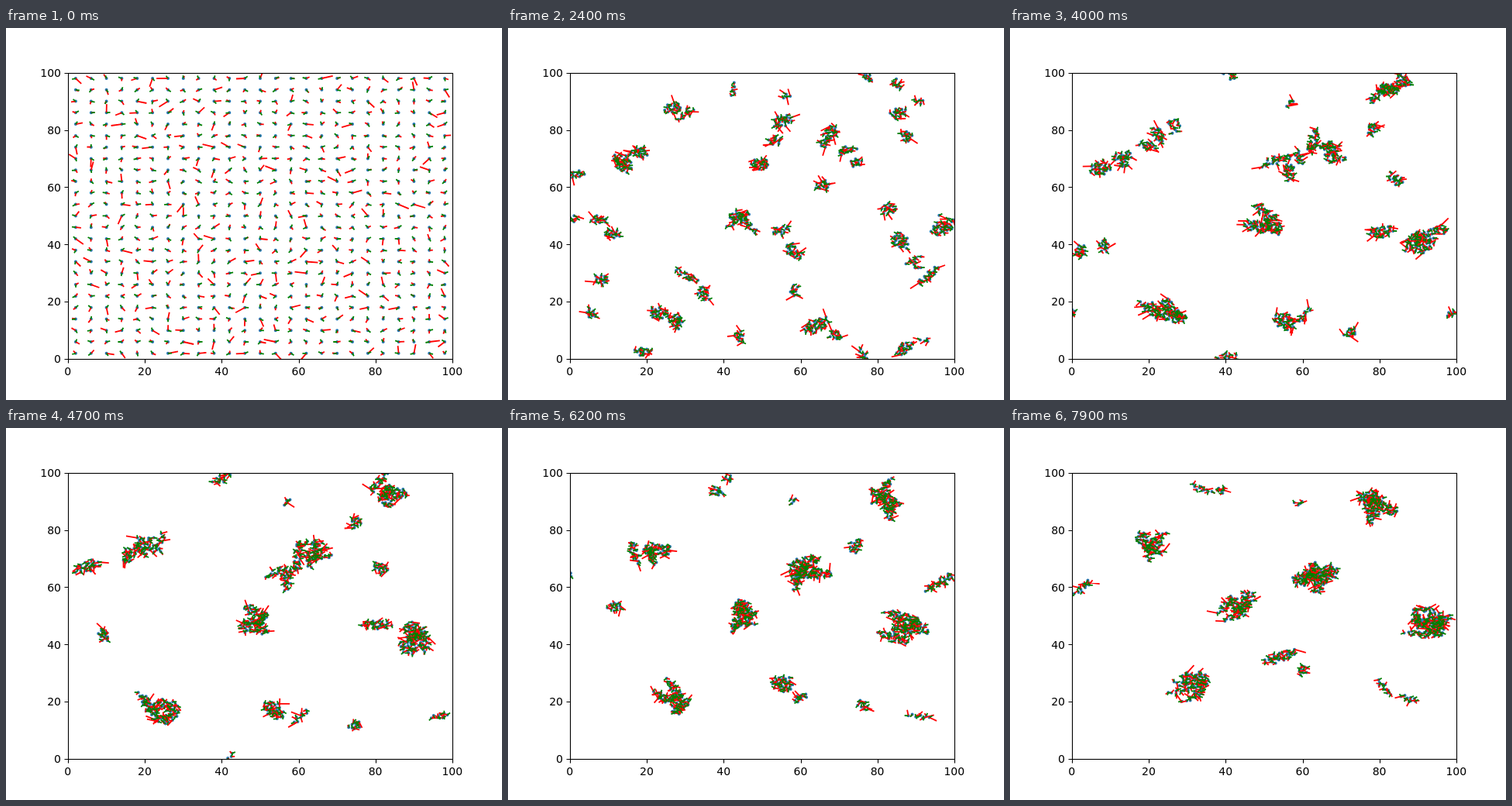
Animation of 640 by 480 pixels, one loop 8000 ms. Source, as an HTML page:

```html
<!DOCTYPE html>
<html lang="en">
<head>
<meta charset="utf-8">
<title>Swarm</title>
<style>
  html, body { margin: 0; width: 100%; height: 100%; overflow: hidden; background: #fff; }
  svg { display: block; width: 640px; height: 480px; }
  text { font: 14px "DejaVu Sans", sans-serif; }
  path { fill: none; }
</style>
</head>
<body>
<svg viewBox="0 0 640 480">
  <clipPath id="plot"><rect x="80" y="58" width="496" height="369.5"/></clipPath>
  <g clip-path="url(#plot)">
    <path id="dots" stroke="#1f77b4" stroke-width="4" stroke-linecap="round"/>
    <path id="forces" stroke="#f00" stroke-width="1.8"/>
    <path id="headings" stroke="#008000" stroke-width="1.8"/>
  </g>
  <g id="axes" stroke="#000" stroke-width="1.11">
    <rect x="80.5" y="58.5" width="496" height="369" fill="none"/>
  </g>
  <g id="labels"></g>
</svg>
<script>
const SIDE = 25, COUNT = SIDE * SIDE, FRAMES = 80, STEP = 100;
const FLOCKS = 58, GATHERED = 11, TAU = 2 * Math.PI;
const byId = id => document.getElementById(id);
const px = x => 80 + x * 4.96;
const py = y => 427.2 - y * 3.696;
const wrap = v => ((v % 100) + 100) % 100;
const delta = (a, b) => wrap(b - a + 50) - 50;

// Deterministic noise in 0..1
function hash(a, b = 0) {
  let h = Math.imul(a + 1, 0x9e3779b1) ^ Math.imul(b + 7, 0x85ebca6b);
  h = Math.imul(h ^ (h >>> 15), 0x2c1b3c6d);
  h = Math.imul(h ^ (h >>> 13), 0x297a2d39);
  return ((h ^ (h >>> 16)) >>> 0) / 4294967296;
}

// Where the largest flocks gather, biggest first; the others spread evenly
const gatherings = [
  [52.5, 91], [87, 34.5], [71.5, 18.5], [92.5, 54], [12.5, 76.5], [91.5, 91],
  [37, 45.5], [70, 72.5], [96, 3.5], [34.5, 87.5], [30, 17], [33, 53.5], [98.5, 20], [56, 41.5]
];
const flocks = Array.from({ length: FLOCKS }, (_, i) => {
  const [x, y] = gatherings[i] || [wrap(i * 75.488), wrap(i * 56.984)];
  const pull = i < gatherings.length ? 100 - 4 * i : 30 * hash(i, 1);
  return { x, y, pull, size: 0, path: [] };
});

// Each particle starts on the grid and joins the flock that draws it most
const particles = Array.from({ length: COUNT }, (_, i) => {
  const x = 2 + 4 * (i % SIDE), y = 2 + 4 * Math.floor(i / SIDE);
  const distance = f => delta(x, f.x) ** 2 + delta(y, f.y) ** 2 - f.pull;
  const flock = flocks.reduce((best, f) => distance(f) < distance(best) ? f : best);
  return { x, y, flock, slot: flock.size++ };
});

// Large flocks roam, tiny ones stay; neighbours drift together until they touch
function moveFlocks(frame) {
  const moves = flocks.map((f, i) => {
    const angle = TAU * hash(i, 2) + 1.2 * Math.sin(frame * .07 + TAU * hash(i, 3));
    const speed = .7 * Math.min(1, f.size / 12) ** 2;
    let dx = speed * Math.cos(angle), dy = speed * Math.sin(angle);
    for (const g of flocks) {
      if (g === f || !g.size) continue;
      const gx = delta(f.x, g.x), gy = delta(f.y, g.y), d = Math.hypot(gx, gy) || 1;
      if (d > 11) continue;
      const touch = .5 * (Math.sqrt(f.size) + Math.sqrt(g.size));
      const force = Math.max(-.8, Math.min(.6, (d - touch) * .25)) * g.size / (f.size + g.size);
      dx += force * gx / d;
      dy += force * gy / d;
    }
    return [dx, dy];
  });
  flocks.forEach((f, i) => {
    f.x += moves[i][0];
    f.y += moves[i][1];
  });
}
for (let frame = 0; frame < FRAMES; frame++) {
  if (frame > GATHERED) moveFlocks(frame);
  for (const f of flocks) f.path.push([f.x, f.y]);
}

// A disc of evenly spaced slots, drawn out into a bent band and back
function place(p, i, frame) {
  const id = flocks.indexOf(p.flock), [cx, cy] = p.flock.path[frame];
  const r = .54 * Math.sqrt(p.slot + .5), a = p.slot * 2.39996;
  const phase = TAU * hash(id, 4);
  const stretch = Math.exp(.25 + .5 * Math.sin(phase + frame * .07));
  const along = r * Math.cos(a) * stretch + .35 * (hash(i, 5) - .5);
  const across = r * Math.sin(a) / stretch + .35 * (hash(i, 6) - .5)
    + (hash(id, 7) - .5) * .25 * along * along / Math.sqrt(p.flock.size);
  const turn = phase * 3 + frame * .05 * (hash(id, 8) - .5);
  const x = cx + along * Math.cos(turn) - across * Math.sin(turn);
  const y = cy + along * Math.sin(turn) + across * Math.cos(turn);
  const u = 1 - (1 - Math.min(1, frame / GATHERED)) ** 1.8;
  return [wrap(p.x + delta(p.x, x) * u), wrap(p.y + delta(p.y, y) * u)];
}

function render(frame) {
  let dots = "", forces = "", headings = "";
  particles.forEach((p, i) => {
    const [x, y] = place(p, i, frame);
    const ray = (angle, length) => `M${px(x).toFixed(1)} ${py(y).toFixed(1)}l` +
      `${(length * 4.96 * Math.cos(angle)).toFixed(1)} ${(-length * 3.696 * Math.sin(angle)).toFixed(1)}`;
    dots += ray(0, 0);
    headings += ray(TAU * hash(i, 9) + frame * (hash(i, 10) - .5) * .5, 1);
    forces += ray(TAU * hash(i, frame + 100), .9 + 2.3 * hash(i, frame + 200) ** 3);
  });
  byId("dots").setAttribute("d", dots);
  byId("forces").setAttribute("d", forces);
  byId("headings").setAttribute("d", headings);
}

let ticks = "", labels = "";
for (let v = 0; v <= 100; v += 20) {
  const x = Math.round(px(v)) + .5, y = Math.round(py(v)) + .5;
  ticks += `<path d="M${x} 427.5v5M80.5 ${y}h-5"/>`;
  labels += `<text x="${px(v) - .2}" y="447.6" text-anchor="middle">${v}</text>` +
    `<text x="71" y="${py(v) + 5.2}" text-anchor="end">${v}</text>`;
}
byId("axes").insertAdjacentHTML("beforeend", ticks);
byId("labels").innerHTML = labels;

const start = performance.now();
let shown = -1;
function tick() {
  const frame = Math.floor((performance.now() - start) / STEP) % FRAMES;
  if (frame !== shown) render(shown = frame);
  requestAnimationFrame(tick);
}
tick();
</script>
</body>
</html>
```
